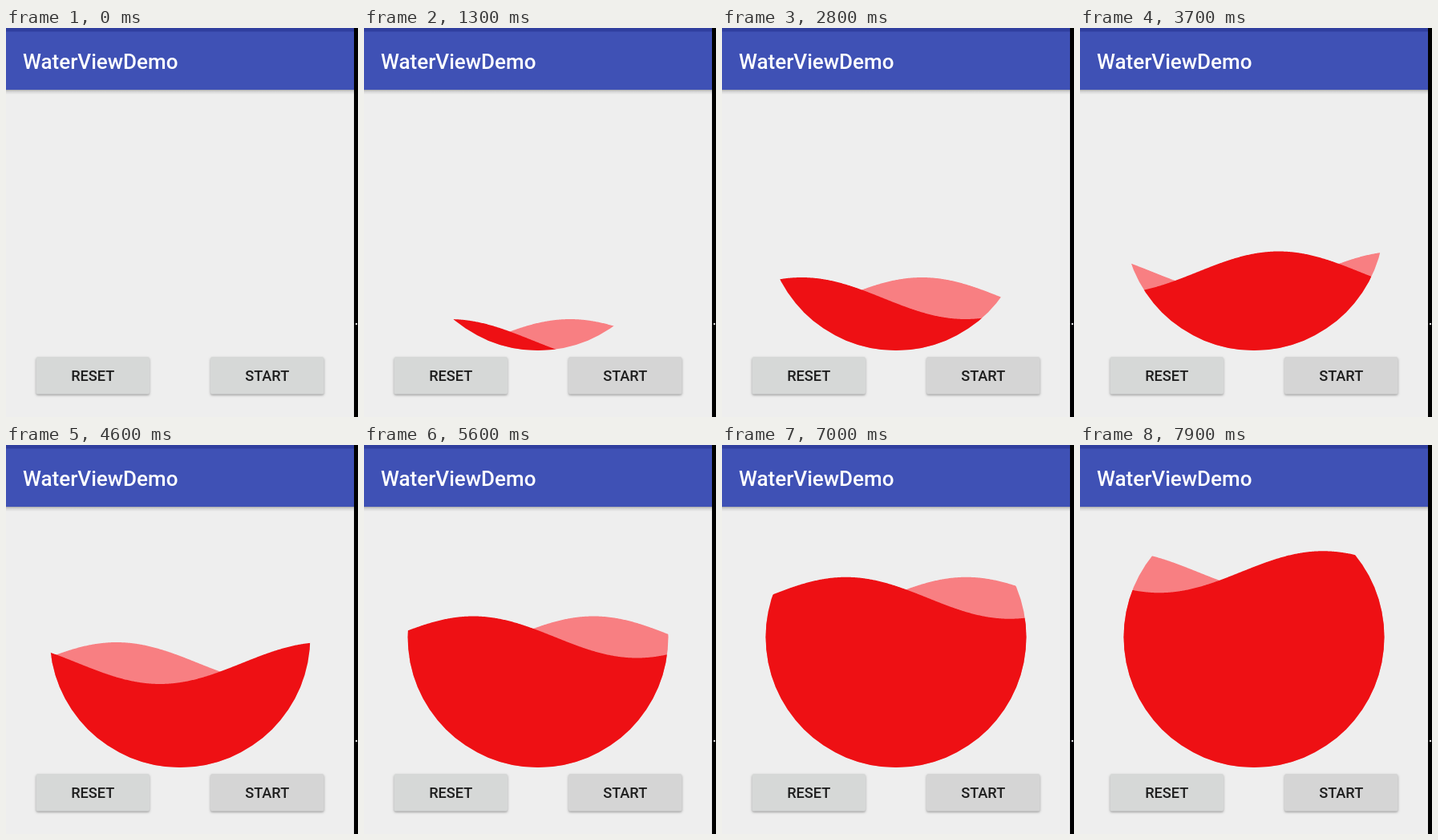
An HTML page with a canvas that plays this animation: 439x485 px, repeating every 8 s.

```html
<!DOCTYPE html>
<html lang="en">
<head>
<meta charset="utf-8">
<title>Water view</title>
<style>
  html, body { margin: 0; width: 100%; height: 100%; overflow: hidden; background: #eee; }
  canvas { display: block; }
</style>
</head>
<body>
<canvas id="stage" width="439" height="485"></canvas>
<script>
const ctx = document.getElementById('stage').getContext('2d');
const LOOP = 8000, STEP = 100, START = 900, STALL = 4800;
const CIRCLE = { x: 217, y: 239.5, r: 162.5 };
const AMPLITUDE = 26, WAVE_SCALE = 65, BACK_OFFSET = 150;

function rect(color, x, y, w, h) {
  ctx.fillStyle = color;
  ctx.fillRect(x, y, w, h);
}

function text(label, x, y, size, color, align) {
  ctx.font = `500 ${size}px Roboto, sans-serif`;
  ctx.textAlign = align;
  ctx.fillStyle = color;
  ctx.fillText(label, x, y);
}

function button(label, x, color) {
  ctx.save();
  ctx.shadowColor = 'rgba(0,0,0,.32)';
  ctx.shadowBlur = 3;
  ctx.shadowOffsetY = 1.5;
  ctx.fillStyle = color;
  ctx.beginPath();
  ctx.roundRect(x, 410, 141.5, 46.5, 2.5);
  ctx.fill();
  ctx.restore();
  text(label, x + 70.75, 440, 18.2, '#1e1e1e', 'center');
}

// Whole percent filled; the counter skips a value about every tenth step.
function percentAt(time) {
  const step = Math.floor((time - START) / STEP) + 1 - (time >= STALL ? 1 : 0);
  return step - 1 + Math.max(0, Math.floor((step - 7.55) / 9.7));
}

function wave(color, crest, level) {
  const { x, y, r } = CIRCLE, left = x - r - 1, right = x + r + 1;
  ctx.beginPath();
  ctx.moveTo(left, y + r + 1);
  for (let px = left; px <= right; px++) {
    ctx.lineTo(px, level - AMPLITUDE * Math.cos((px - crest) / WAVE_SCALE));
  }
  ctx.lineTo(right, y + r + 1);
  ctx.fillStyle = color;
  ctx.fill();
}

function water(percent) {
  const { x, y, r } = CIRCLE;
  const level = y + r - percent / 100 * 2 * r;
  const crest = 211 - 26 * percent;
  ctx.save();
  ctx.beginPath();
  ctx.arc(x, y, r, 0, 2 * Math.PI);
  ctx.clip();
  wave('#f87f82', crest + BACK_OFFSET, level);
  wave('#ee1014', crest, level);
  ctx.restore();
}

function draw(time) {
  const started = time >= START;
  rect('#eee', 0, 0, 439, 485);
  const shadow = ctx.createLinearGradient(0, 77, 0, 83);
  shadow.addColorStop(0, 'rgba(0,0,0,.27)');
  shadow.addColorStop(.4, 'rgba(0,0,0,.1)');
  shadow.addColorStop(1, 'rgba(0,0,0,0)');
  rect(shadow, 0, 77, 434, 6);
  rect('#3f51b5', 0, 0, 434, 77);
  rect('#303f9f', 0, 0, 434, 4.5);
  text('WaterViewDemo', 21, 51, 26, '#fff', 'left');

  button('RESET', 37.5, '#d6d8d7');
  button('START', 255, started ? '#d5d5d5' : '#d6d8d7');
  if (started) water(percentAt(time));

  rect('#000', 434, 0, 5, 485);
  rect('#fff', 436, 368, 2, 2);
}

function frame() {
  draw(performance.now() % LOOP);
  requestAnimationFrame(frame);
}
frame();
</script>
</body>
</html>
```
